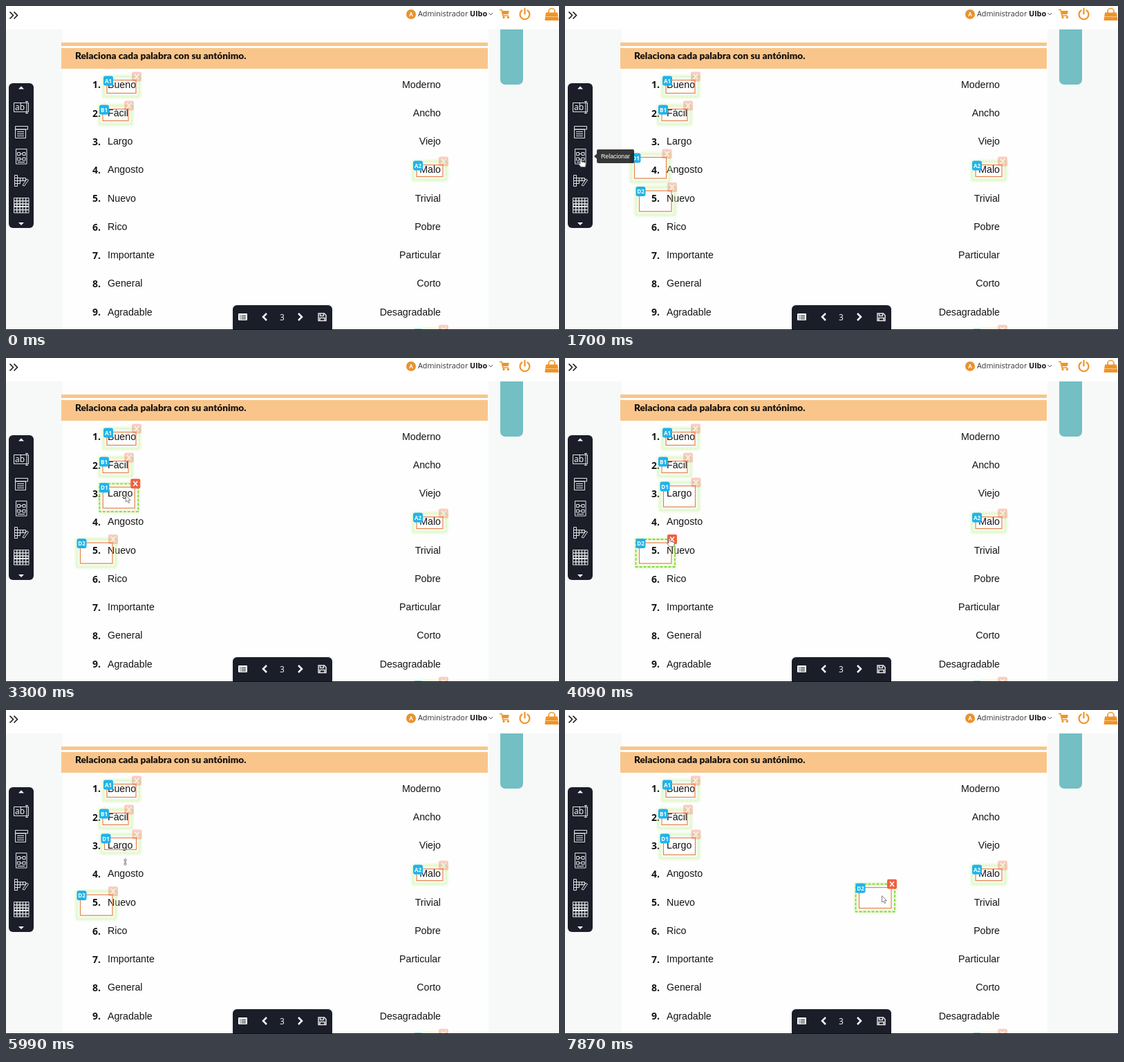
An HTML page that plays this animation: 800 by 470 pixels, repeating every 7990 ms.

```html
<!DOCTYPE html>
<html lang="es">
<head>
<meta charset="utf-8">
<title>Relaciona</title>
<style>
  html, body { margin: 0; width: 100%; height: 100%; overflow: hidden; background: #fff; }
  svg { display: block; }
  .words { font: 14.2px "Liberation Sans", Arial, sans-serif; fill: #151515; }
  .num { font: 700 14px "Open Sans", sans-serif; text-anchor: end; }
  .title { font: 900 13.65px Lato, sans-serif; fill: #15120f; }
  .user { font: 10.8px "Open Sans", sans-serif; fill: #333; }
  .tag { font: 700 8px "Open Sans", sans-serif; fill: #fff; text-anchor: middle; }
  .tip { font: 8.8px "Liberation Sans", Arial, sans-serif; fill: #fff; }
  .light { font: 12px "Open Sans", sans-serif; fill: #fff; text-anchor: middle; }
  .line { fill: none; stroke: #e4e5e8; }
  .end { text-anchor: end; }
</style>
</head>
<body>
<svg width="800" height="470">
  <defs>
    <filter id="soft" x="-30%" y="-50%" width="160%" height="200%"><feGaussianBlur stdDeviation="1.8"/></filter>
    <g id="chevron"><path d="M-2.500-5l5 5-5 5" fill="none"/></g>
  </defs>

  <!-- worksheet -->
  <rect y="34" width="800" height="436" fill="#f6f9f8"/>
  <rect x="82" y="34" width="616" height="436" fill="#fefefe"/>
  <rect x="715" y="20" width="33" height="94" rx="7" fill="#73bfc3"/>
  <rect width="800" height="34" fill="#fff"/>
  <path d="M80 53h617v5H80zM80 61h617v30H80z" fill="#f9c58a"/>
  <text class="title" x="100" y="77">Relaciona cada palabra con su antónimo.</text>
  <g id="words" class="words"></g>
  <g id="boxes"></g>

  <!-- header -->
  <g stroke="#111" stroke-width="1.5">
    <use href="#chevron" x="8" y="13.500"/><use href="#chevron" x="14" y="13.500"/>
    <use href="#chevron" transform="translate(701.300 11.500) rotate(90) scale(.55)"/>
  </g>
  <circle cx="586" cy="12" r="7" fill="#e9922c"/>
  <text class="tag" x="586" y="15">A</text>
  <text class="user" x="596" y="15">Administrador <tspan font-weight="700" fill="#111">Ulbo</tspan></text>
  <g fill="none" stroke="#ef9426" stroke-width="1.7">
    <path d="M714 5.500h3l2 8.500h8M785 11V8a4.500 4.500 0 0 1 9 0v3"/>
    <path d="M718 7h10l-1.500 5h-7.500zM781 9.500h17l1.500 11.500h-20z" fill="#ef9426" stroke="none"/>
    <circle cx="720" cy="16.500" r=".8"/><circle cx="726.500" cy="16.500" r=".8"/>
    <path d="M746.500 6.500a7 7 0 1 0 8 0M750.500 3.500v8" stroke-width="2.200" stroke-linecap="round"/>
    <path d="M780 15.500h19" stroke="#fbd5a4" stroke-width=".8"/>
  </g>

  <!-- tool strip -->
  <rect x="4" y="112" width="36" height="210" rx="6" fill="#1b1e29"/>
  <path d="M18 120.500l4-4 4 4zM18 314l4 4 4-4z" fill="#fff"/>
  <path id="icons" class="line"/>
  <text class="light" x="20" y="151">ab</text>

  <!-- pager -->
  <rect x="328" y="434" width="144" height="50" rx="6" fill="#1b1e29"/>
  <rect x="336" y="446" width="13" height="10" rx="1" fill="#fff"/>
  <path d="M338 449.500h9M338 451.800h9M338 454h9" stroke="#1b1e29" stroke-dasharray="1.500 1 6.500"/>
  <g stroke="#fff" stroke-width="2.500">
    <use href="#chevron" transform="translate(374.500 451) scale(-1 1)"/><use href="#chevron" x="425.500" y="451"/>
  </g>
  <text class="light" x="399.500" y="456">3</text>
  <path class="line" d="M452 446h8.500l2.500 2.500v8h-11zM454.500 446v3.500h5V446M454 456.500v-4h7v4" stroke-width="1.500"/>
  <path d="M0 469.500h800" stroke="#111"/>

  <g id="tip">
    <rect x="46" y="208" width="54" height="20" rx="2" fill="#222"/>
    <path d="M42 218l4-3.500v7z" fill="#222"/>
  </g>
  <text id="tipText" class="tip" x="52" y="221">Relacionar</text>

  <g id="cursor" fill="#fff" stroke="#666" stroke-width=".8" stroke-linejoin="round">
    <path id="arrow" d="M0 0v9.500l2.200-2 1.600 3.500 1.600-.7-1.600-3.400h3z"/>
    <path id="hand" d="M-1 1q1-2 2 0v4l5 1q1.500.500 1.200 2.500l-.7 4H0L-3.500 8q0-1.500 1.200-1l1.300 1z"/>
    <path id="resize" d="M0-5l2 2.500H.5v5H2L0 5l-2-2.500h1.500v-5H-2z"/>
  </g>
</svg>

<script>
const $ = id => document.getElementById(id);
const LOOP = 7990, ROW = 41.25;

const pairs = `Bueno Moderno,Fácil Ancho,Largo Viejo,Angosto Malo,Nuevo Trivial,
  Rico Pobre,Importante Particular,General Corto,Agradable Desagradable`.split(",");
$("words").innerHTML = pairs.map((pair, i) => {
  const [left, right] = pair.trim().split(" "), y = 118.6 + i * ROW;
  return `<text class="num" x="137" y="${y + .7}">${i + 1}.</text>
    <text x="147" y="${y}">${left}</text><text class="end" x="629" y="${y}">${right}</text>`;
}).join("");

// Tool icons are built from outlined cells.
const cell = (x, y, w, h = w) => `M${x} ${y}h${w}v${h}h${-w}z`;
const cells = (cols, rows, x, y, size, gap = size) =>
  Array.from({ length: cols * rows }, (_, i) =>
    cell(x + i % cols * gap, y + Math.floor(i / cols) * gap, size)).join("");
$("icons").setAttribute("d", [
  cell(11.5, 140.5, 21, 13), "M28 138.500h4M28 155.500h4M30 138.500v17",
  cell(13.5, 174.5, 18, 4.5), cell(13.5, 179, 15, 12.5), "M16 182.500h10M16 185.500h10M16 188.500h10",
  cell(14.5, 207.5, 15.5, 21.5), cells(2, 2, 16.5, 212.5, 4, 7.5), "M20.500 214.500h3.500M20.500 222h3.500M17 226.500h10",
  cells(1, 4, 12.5, 245.5, 4), cells(4, 1, 12.5, 249.5, 4), "M16.500 257.500h4v-4M24 260l6-9 2.500 1.500-6 8.500z",
  cells(5, 5, 11.5, 278.5, 4.3), cell(12, 287.5, 20, 3)
].join(""));

// Eased progress 0..1 between two times.
function ease(t, start, end) {
  const u = Math.min(1, Math.max(0, (t - start) / (end - start)));
  return u * u * (3 - 2 * u);
}

// Boxes placed in front of the words, plus the new pair that is dragged and resized.
function boxesAt(t) {
  const box = (label, x, y, w, h) => ({ label, x, y, w, h });
  const drag1 = ease(t, 2690, 3400), drag2 = ease(t, 6810, 7850);
  const shrink = ease(t, 5160, 5750), regrow = ease(t, 6130, 6340);
  return {
    fixed: [box("A1", 146, 107.5, 42, 19), box("B1", 140, 149.5, 37, 17),
      box("A2", 594, 230.5, 38, 17), box("B2", 594, 474.5, 38, 17)],
    d1: box("D1", 100.5 + 42 * drag1, 219.5 - 34 * drag1, 46, 30.5 - 13.5 * shrink + 7.5 * regrow),
    d2: box("D2", 107.5 + 318 * drag2, 268 - 10.5 * drag2, 46.5, 30)
  };
}

// The pointer travels between places; places on a box move along with it.
const places = {
  outside: () => [680, 490],
  tool: () => [23, 221],
  body: b => [b.x + 33, b.y + 12],
  close: b => [b.x + b.w - 3, b.y - 7],
  edge: b => [b.x + 28, b.y + b.h + 6],
  below: b => [b.x + 30, b.y + b.h + 18]
};
const stops = [
  { leave: 120, arrive: 820, place: "tool", shape: "hand" },
  { leave: 1810, arrive: 2450, place: "body", on: "d1", shape: "arrow" },
  { leave: 3500, arrive: 4000, place: "close", on: "d2", shape: "hand" },
  { leave: 4300, arrive: 4950, place: "edge", on: "d1", shape: "resize" },
  { leave: 5780, arrive: 5960, place: "below", on: "d1", shape: "resize" },
  { leave: 6000, arrive: 6120, place: "edge", on: "d1", shape: "resize" },
  { leave: 6380, arrive: 6700, place: "body", on: "d2", shape: "arrow" }
];

function pointerAt(t, boxes) {
  let [x, y] = places.outside(), shape = "arrow";
  for (const stop of stops) {
    if (t < stop.leave) break;
    const [px, py] = places[stop.place](boxes[stop.on]), k = ease(t, stop.leave, stop.arrive);
    x += (px - x) * k;
    y += (py - y) * k;
    shape = k > .95 ? stop.shape : "arrow";
  }
  return { x, y, shape };
}

function drawBox({ label, x, y, w, h }, active) {
  const rim = `x="${x - 5}" y="${y - 5}" width="${w + 10}" height="${h + 10}" fill="none"`;
  return `<rect ${rim} rx="2" stroke="#c9f2a2" stroke-width="5" opacity=".42" filter="url(#soft)"/>
    <rect ${rim} stroke="#85d838" stroke-width="1.8" stroke-dasharray="4 2" opacity="${active ? 1 : .08}"/>
    <rect x="${x}" y="${y}" width="${w}" height="${h}" fill="none" stroke="#e58348" stroke-width="1.2"/>
    <rect x="${x - 5}" y="${y - 6}" width="14" height="14" rx="3" fill="#1fb3ec"/>
    <text class="tag" x="${x + 2}" y="${y + 4}">${label}</text>
    <g opacity="${active ? 1 : .3}"><rect x="${x + w - 6}" y="${y - 12}" width="14" height="14" rx="2" fill="#f2603f"/>
    <path d="M${x + w - 2} ${y - 8.5}l6 7m0-7l-6 7" stroke="#fff" stroke-width="1.5"/></g>`;
}

function render(t) {
  const boxes = boxesAt(t), pointer = pointerAt(t, boxes);
  const hovered = b => Math.abs(pointer.x - b.x - b.w / 2) < b.w / 2 + 8
    && Math.abs(pointer.y - b.y - b.h / 2) < b.h / 2 + 8;
  const visible = t < 1350 ? boxes.fixed : [...boxes.fixed, boxes.d1, boxes.d2];
  $("boxes").innerHTML = visible.map(b => drawBox(b, hovered(b))).join("");

  for (const id of ["arrow", "hand", "resize"]) $(id).style.display = id === pointer.shape ? "" : "none";
  $("cursor").setAttribute("transform", `translate(${pointer.x} ${pointer.y})`);

  const tip = .9 * (ease(t, 840, 1020) - ease(t, 1780, 1930));
  $("tip").setAttribute("opacity", tip);
  $("tipText").setAttribute("opacity", Math.min(1, tip * 3));
}

function frame() {
  render(performance.now() % LOOP);
  requestAnimationFrame(frame);
}
frame();
</script>
</body>
</html>
```
